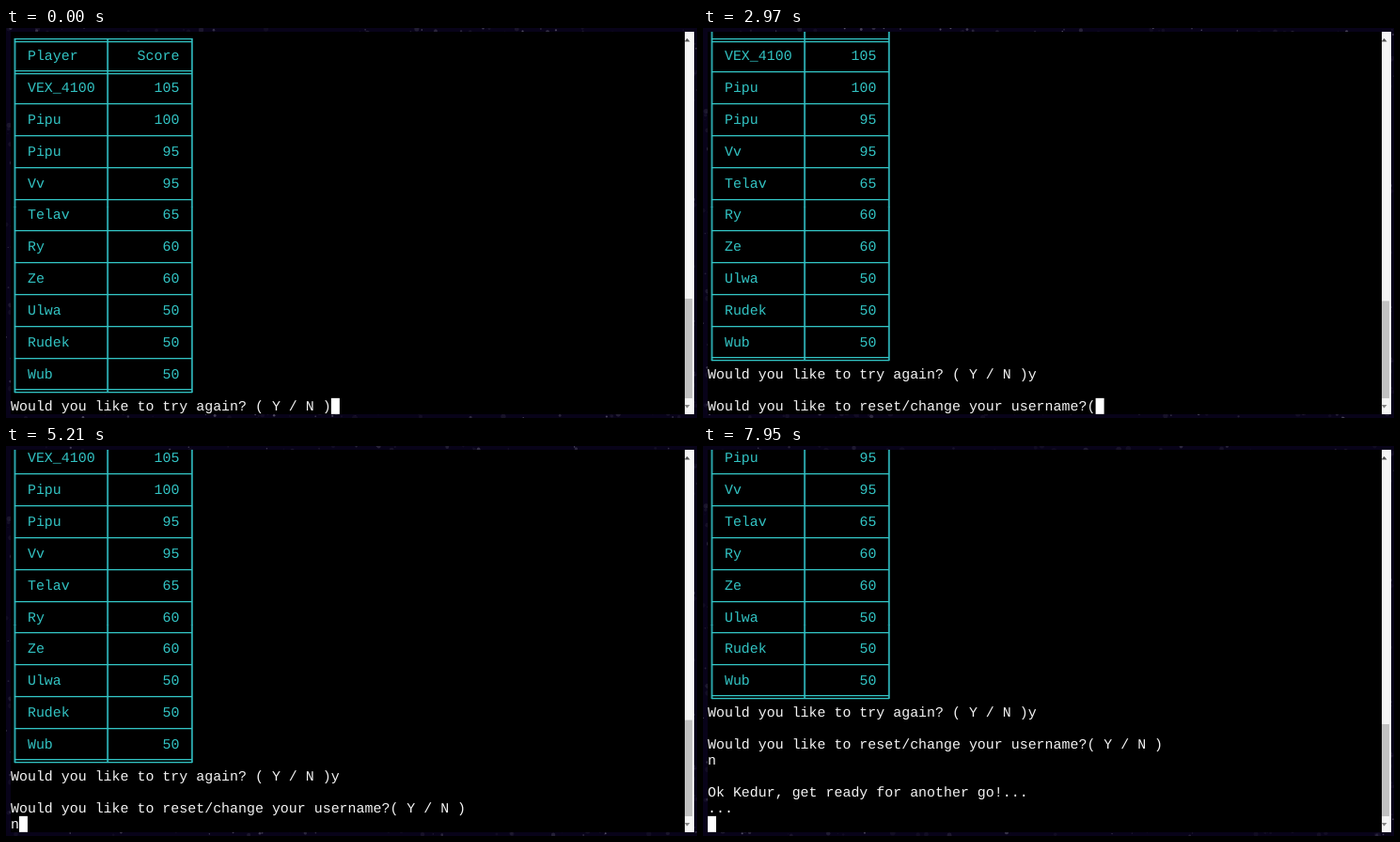
An HTML page with a canvas that plays this animation: 735 px wide and 415 px high, repeating every 8 s.

```html
<!DOCTYPE html>
<html lang="en">
<head>
<meta charset="utf-8">
<title>Terminal high scores</title>
<style>
  html, body { margin: 0; width: 100%; height: 100%; overflow: hidden; background: #080319; }
  canvas { display: block; }
</style>
</head>
<body>
<canvas id="stage" width="735" height="415"></canvas>
<script>
const ctx = document.getElementById('stage').getContext('2d');
const LOOP = 8000, STEP = 80;
const LEFT = 5, TOP = 4, COL = 8.97, ROW = 16.95, VISIBLE_ROWS = 24;
const CYAN = '#32c3c3', BORDER = '#2aa3a8', WHITE = '#f4f4f4';

const scores = [
  ['Player', 'Score'], ['VEX_4100', '105'], ['Pipu', '100'], ['Pipu', '95'],
  ['Vv', '95'], ['Telav', '65'], ['Ry', '60'], ['Ze', '60'],
  ['Ulwa', '50'], ['Rudek', '50'], ['Wub', '50']
];
const TABLE_ROWS = scores.length * 2 + 1;

// Console output: start time, text, ms per character (0 = all at once)
const output = [
  [0, 'Would you like to try again? ( Y / N )', 0],
  [780, 'y', 0],
  [1500, '\n\n', 0],
  [1580, 'Would you like to reset/change your username?( Y / N )\n', 30],
  [4830, 'n', 0],
  [5450, '\n\n', 0],
  [5500, 'Ok Kedur, get ready for another go!...\n...\n', 30]
];

function textAt(time) {
  return output.filter(([start]) => time >= start).map(([start, text, pace]) =>
    pace ? text.slice(0, Math.floor((time - start) / pace)) : text).join('');
}

function seeded(seed) {
  return () => (seed = seed * 16807 % 2147483647) / 2147483647;
}

// Mostly faint patches of haze, with a few small bright stars
const random = seeded(4271);
const stars = Array.from({ length: 2600 }, () => {
  const brightness = random() ** 3;
  return {
    x: random() * 735, y: random() * 415,
    size: 1.2 + 5 * random() * (1 - brightness), alpha: 0.06 + 0.5 * brightness
  };
});

function rect(color, x, y, w, h) {
  ctx.fillStyle = color;
  ctx.fillRect(x, y, w, h);
}

function write(text, col, row, color) {
  ctx.fillStyle = color;
  ctx.fillText(text, LEFT + col * COL, TOP + row * ROW + 13);
}

function drawSky(time) {
  rect('#080319', 0, 0, 735, 415);
  const drift = Math.floor(time / STEP) * 0.4;
  ctx.fillStyle = '#aaa6bd';
  for (const { x, y, size, alpha } of stars) {
    ctx.globalAlpha = alpha;
    ctx.beginPath();
    ctx.arc(x, (y + 415 - drift) % 415, size / 2, 0, 7);
    ctx.fill();
  }
  ctx.globalAlpha = 1;
}

function drawTableRow(index, row) {
  const y = Math.round(TOP + row * ROW);
  const first = index === 0, last = index === TABLE_ROWS - 1;
  const from = first ? y + 7 : y;
  const to = last ? y + 11 : y + 17;
  for (const col of [0, 11, 21])
    rect(BORDER, LEFT + (col + 0.5) * COL - 1, from, 2, to - from);

  if (index % 2) {
    const [player, score] = scores[(index - 1) / 2];
    write(player, 2, row, CYAN);
    write(score, 20 - score.length, row, CYAN);
  } else {
    const offsets = first || last || index === 2 ? [7, 10] : [8];
    for (const offset of offsets) rect(CYAN, 9, y + offset, 189, 1.3);
  }
}

function arrow(y, direction, color) {
  ctx.fillStyle = color;
  ctx.beginPath();
  ctx.moveTo(721.5, y);
  ctx.lineTo(727.5, y);
  ctx.lineTo(724.5, y + 3.5 * direction);
  ctx.fill();
}

function drawScrollbar(extraLines) {
  const bottom = 394, height = 378 * VISIBLE_ROWS / (85.6 + extraLines);
  rect('#f5f5f5', 722, 4, 10, 407);
  rect('#c1c1c1', 722, bottom - height, 8, height);
  arrow(14.5, -1, '#505050');
  arrow(401, 1, '#858585');
}

function draw(time) {
  const lines = textAt(time).split('\n');
  const scroll = TABLE_ROWS + lines.length - VISIBLE_ROWS;
  drawSky(time);
  rect('#000', LEFT, TOP, 717, 407);
  ctx.font = '14.95px "Liberation Mono", monospace';
  ctx.textRendering = 'geometricPrecision';
  for (let i = scroll; i < TABLE_ROWS; i++) drawTableRow(i, i - scroll);
  lines.forEach((line, i) => write(line, 0, TABLE_ROWS + i - scroll, WHITE));
  rect('#fff', LEFT + lines.at(-1).length * COL, TOP + (VISIBLE_ROWS - 1) * ROW, 9, 17);
  drawScrollbar(lines.length - 1);
}

function frame() {
  draw(performance.now() % LOOP);
  requestAnimationFrame(frame);
}
frame();
</script>
</body>
</html>
```
